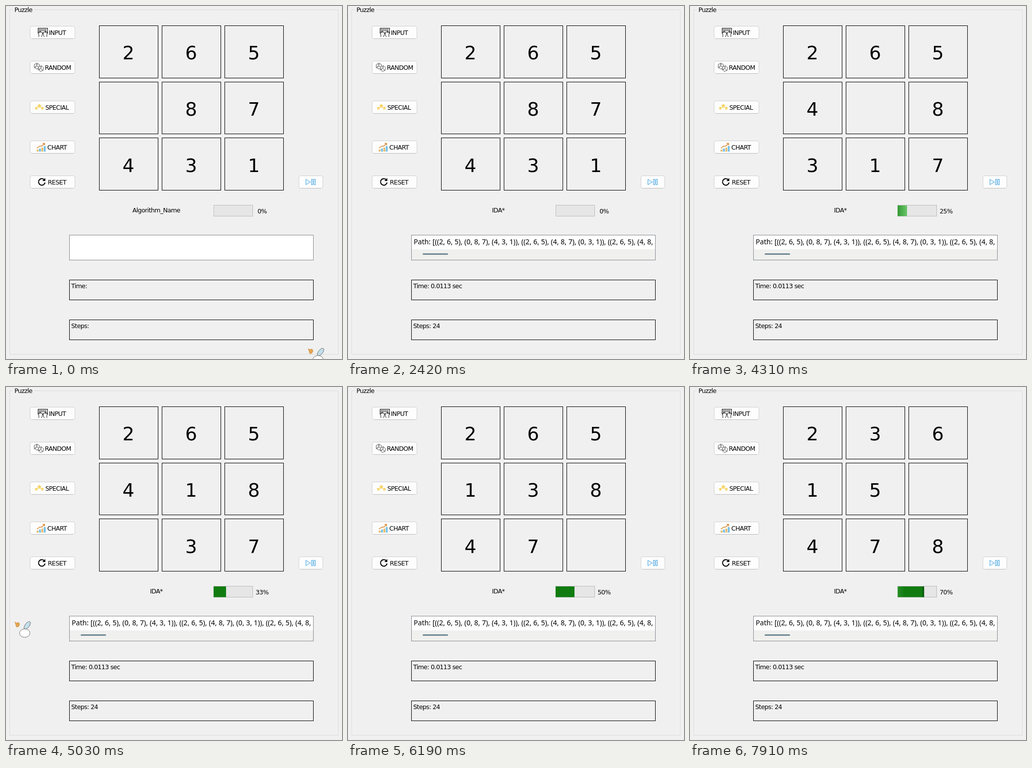
Animation, 675 px wide and 708 px high, one loop 7.99 s. Source, as an HTML page:

```html
<!DOCTYPE html>
<html lang="en">
<head>
<meta charset="utf-8">
<title>Puzzle</title>
<style>
  html, body { margin: 0; height: 100%; overflow: hidden; background: #f0f0f0; }
  svg { display: block; width: 100vw; height: 100vh; }
  text { font: 12.5px "DejaVu Sans", sans-serif; letter-spacing: -.6px; }
  .mid { text-anchor: middle; }
  .digit { font-size: 37.5px; letter-spacing: 0; text-anchor: middle; }
  #path text { font: 14.13px "Noto Sans", "Open Sans", sans-serif; letter-spacing: 0; }
  .line { fill: none; stroke: #000; }
</style>
</head>
<body>
<svg viewBox="0 0 675 708">
  <defs>
    <linearGradient id="glow" gradientUnits="userSpaceOnUse" y1="0" y2="0">
      <stop offset="0" stop-color="#107c10"/>
      <stop offset=".5" stop-color="#6cc76c"/>
      <stop offset=".6" stop-color="#6cc76c"/>
      <stop offset=".85" stop-color="#1f881f"/>
      <stop offset="1" stop-color="#107c10"/>
    </linearGradient>
  </defs>
  <rect width="675" height="708" fill="#f0f0f0"/>
  <path d="M14 7.5H7.5V698.5H667.5V7.5H56" fill="none" stroke="#dcdcdc"/>
  <text x="17" y="12">Puzzle</text>

  <g id="buttons"></g>
  <g id="icons"></g>
  <g id="tiles"></g>

  <text id="name" class="mid" x="302" y="414"></text>
  <rect x="417.5" y="399.5" width="78" height="22" fill="#e6e6e6" stroke="#bcbcbc"/>
  <rect id="bar" x="417" y="400" height="21.5" fill="url(#glow)"/>
  <rect id="tip" y="400" width="3" height="21.5" fill="#0a560a"/>
  <text id="percent" class="mid" x="514.5" y="416"></text>

  <rect x="127.5" y="459.5" width="490" height="50" fill="#fff" stroke="#868a90"/>
  <g id="path">
    <rect x="128" y="488" width="489" height="21" fill="#f0f0ee"/>
    <rect x="150" y="496" width="51" height="3" rx="1.5" fill="#728a95"/>
    <text x="132" y="478">Path: [((2, 6, 5), (0, 8, 7), (4, 3, 1)), ((2, 6, 5), (4, 8, 7), (0, 3, 1)), ((2, 6, 5), (4, 8,</text>
  </g>
  <rect class="line" x="127.5" y="549.5" width="490" height="40"/>
  <text id="time" x="131" y="566"></text>
  <rect class="line" x="127.5" y="629.5" width="490" height="40"/>
  <text id="steps" x="131" y="646"></text>

  <g id="cursor" stroke="#666" stroke-width=".9">
    <path d="M1 1l3 2 5-1 2 4-3 5-4 0-1-4z" fill="#e5a54c" stroke="#b98545" stroke-width=".6"/>
    <ellipse cx="26" cy="8" rx="4.3" ry="9" transform="rotate(38 26 8)" fill="#c3dfeb"/>
    <ellipse cx="21" cy="23.5" rx="10.5" ry="8.5" fill="#fff"/>
  </g>
</svg>
<script>
const $ = id => document.getElementById(id);
const LOOP = 7990, SOLVED = 2420;
const START = [2, 6, 5, 0, 8, 7, 4, 3, 1];
const MOVES = 'DRRULDLURDRUULDR';
const SHIFT = { U: -3, D: 3, L: -1, R: 1 };
// First entry starts the playback, each later one slides a tile
const TIMES = [2700, 3050, 3370, 3720, 4020, 4310, 4600, 4920, 5250, 5610, 5900, 6190,
  6470, 6820, 7170, 7500, 7780];
const BOARDS = [START];
for (const move of MOVES) {
  const board = [...BOARDS[BOARDS.length - 1]];
  const from = board.indexOf(0), to = from + SHIFT[move];
  board[from] = board[to];
  board[to] = 0;
  BOARDS.push(board);
}

// Static parts
const button = (x, y, w, label = '', tx = 0) =>
  `<rect x="${x + .5}" y="${y + .5}" width="${w}" height="25" rx="3.5" fill="#fdfdfd" stroke="#d0d0d0"/>
   <path d="M${x + 4} ${y + 25.5}h${w - 7}" stroke="#bbb"/>
   <text x="${tx}" y="${y + 18}">${label}</text>`;
$('buttons').innerHTML = button(48, 40, 90, 'INPUT', 86) + button(48, 110, 90, 'RANDOM', 78) +
  button(48, 190, 90, 'SPECIAL', 79) + button(48, 270, 90, 'CHART', 83) +
  button(48, 340, 90, 'RESET', 84) + button(588, 340, 48);

const polar = (x, y, r, deg) => {
  const a = deg * Math.PI / 180;
  return `${(x + r * Math.cos(a)).toFixed(2)} ${(y + r * Math.sin(a)).toFixed(2)}`;
};
const star = (x, y, r) => {
  const pts = Array.from({ length: 10 }, (_, i) => polar(x, y, i % 2 ? r * .55 : r, i * 36 - 90));
  return `<path d="M${pts.join('L')}Z" fill="#f6d568" stroke="#f6d568" stroke-linejoin="round"/>`;
};
const cube = (x, y, r, turn) => {
  const p = i => polar(x, y, r, i * 60 + 30 + turn);
  const spokes = [1, 3, 5].map(i => `M${x} ${y}L${p(i - 1)}`).join('');
  return `<path d="M${[0, 1, 2, 3, 4, 5].map(p).join('L')}Z${spokes}" fill="#fdfdfd" stroke="#333" stroke-width=".8"/>
    <circle cx="${x}" cy="${y - r / 2}" r=".7"/><circle cx="${x - r / 2}" cy="${y + r / 3}" r=".7"/>`;
};
const column = (x, h, color) => `<rect x="${x}" y="${292 - h}" width="3.8" height="${h}" fill="${color}"/>`;
$('icons').innerHTML = `
  <rect class="line" x="64.5" y="44.5" width="19" height="10"/>
  <path class="line" d="M66 47h16M66 49.5h16" stroke-width="1.4" stroke-dasharray="1.6 1.1"/>
  <path d="M66 62v-4l-1-5 2-2 1 3 1-4 2 3 2 0 0 5-2 4M82 62v-4l1-5-2-2-1 3-1-4-2 3-2 0 0 5 2 4"
    fill="#fff" stroke="#000" stroke-width=".9"/>
  ${cube(62, 120.5, 6, 0)}${cube(70, 125.5, 5.8, 12)}
  ${star(67, 200.5, 4)}${star(61, 205, 3)}${star(73, 205, 3)}
  ${column(61.5, 4, '#e6bd72')}${column(66.3, 6, '#74c0e8')}${column(71.1, 8, '#e6bd72')}${column(75.9, 11, '#74c0e8')}
  <path d="M62 285l6-4 4 0 5-5M73.500 275.500l4 0 0 4" fill="none" stroke="#d8862f" stroke-width="1.5"/>
  <path class="line" d="M77 348.500A6.600 6.600 0 1 0 78.500 354" stroke-width="2"/>
  <path d="M79 345v6h-6z"/>
  <path d="M602.500 347.500l9 5.500-9 5.500zM613.500 347.500h3v11h-3zM618.500 347.500h3v11h-3z"
    fill="#e9f5fd" stroke="#4ba6de"/>`;

const ROWS = [39.5, 152.5, 264.5];
$('tiles').innerHTML = START.map((_, i) => {
  const x = 187.5 + i % 3 * 126, row = Math.floor(i / 3);
  return `<rect class="line" x="${x}" y="${ROWS[row]}" width="118" height="${row === 1 ? 104 : 105}"/>
    <text class="digit" x="${x + 58.5}" y="${106.5 + row * 113}"></text>`;
}).join('');
const digits = document.querySelectorAll('.digit');

// Pointer trips: [time, x, y]
const TRIPS = [
  [[0, 606, 686], [60, 606, 686], [280, 0, 340], [345, -40, 325]],
  [[5030, 14, 470], [5110, 230, 480], [5180, 500, 488], [5250, 630, 484],
   [5320, 634, 488], [5530, 643, 498], [5610, 650, 506], [5690, 680, 508]]
];
function pointer(t) {
  for (const trip of TRIPS) {
    for (let i = 1; i < trip.length; i++) {
      const [t0, x0, y0] = trip[i - 1], [t1, x1, y1] = trip[i];
      if (t >= t0 && t < t1) {
        const k = (t - t0) / (t1 - t0);
        return [x0 + (x1 - x0) * k, y0 + (y1 - y0) * k];
      }
    }
  }
  return [-100, -100];
}

function draw(t) {
  const shown = TIMES.filter(time => time <= t).length;
  const solved = t >= SOLVED;
  const board = BOARDS[Math.max(0, shown - 1)];
  digits.forEach((el, i) => { el.textContent = board[i] || ''; });

  $('name').textContent = solved ? 'IDA*' : 'Algorithm_Name';
  $('path').style.display = solved ? '' : 'none';
  $('time').textContent = solved ? 'Time: 0.0113 sec' : 'Time:';
  $('steps').textContent = solved ? 'Steps: 24' : 'Steps:';

  const percent = Math.floor(shown * 100 / 24), width = percent * .76;
  $('percent').textContent = percent + '%';
  $('bar').setAttribute('width', width);
  $('tip').setAttribute('x', 414 + width);
  $('tip').style.display = shown === TIMES.length ? '' : 'none';

  // The highlight sweeps the bar once per 1290 ms
  const head = 418 + (t + 1210) % 1290 * .14;
  $('glow').setAttribute('x1', head - 64);
  $('glow').setAttribute('x2', head);

  $('cursor').setAttribute('transform', `translate(${pointer(t)})`);
}

const begin = performance.now();
function frame() {
  draw((performance.now() - begin) % LOOP);
  requestAnimationFrame(frame);
}
frame();
</script>
</body>
</html>
```
